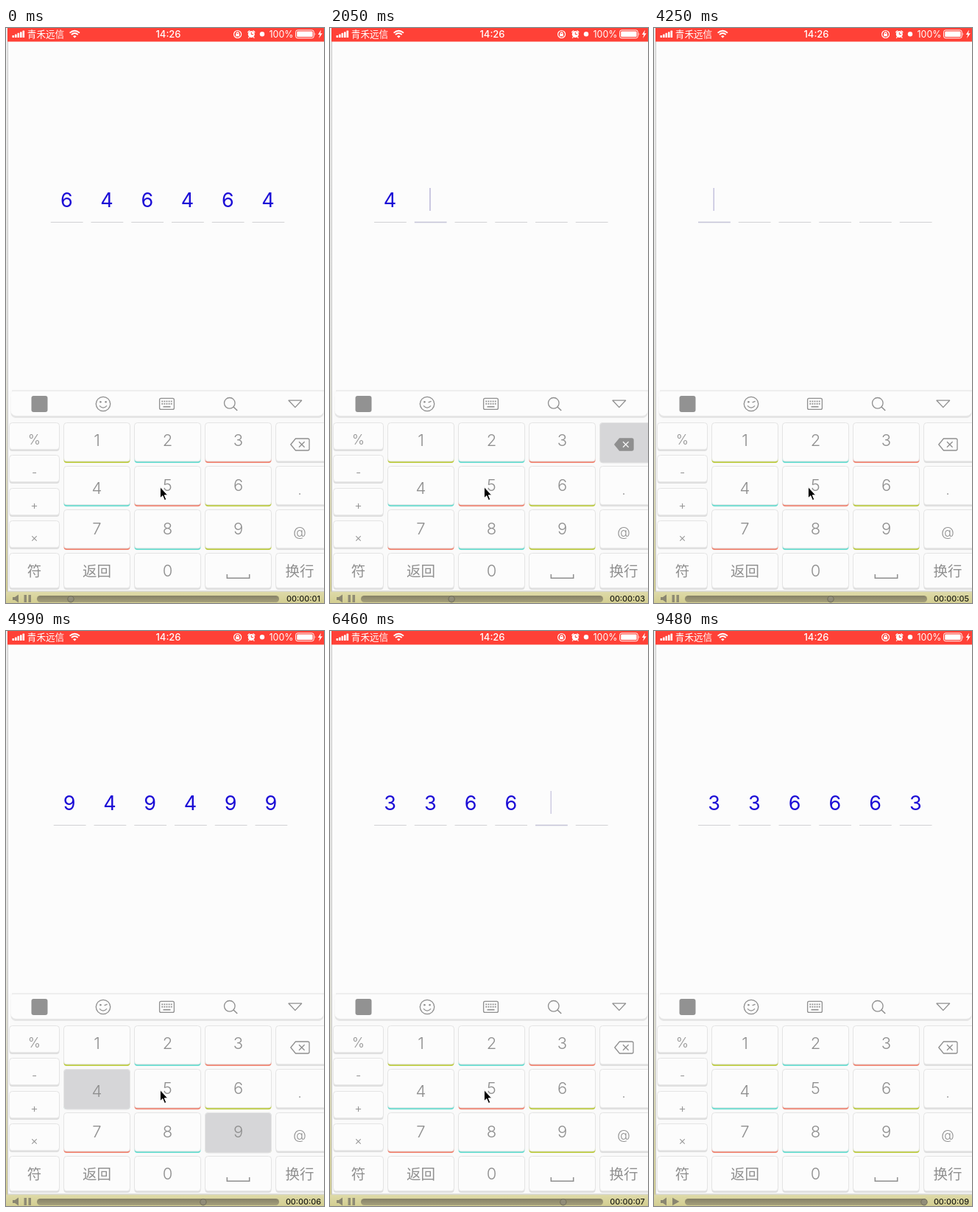
An HTML page that plays this animation: 432 by 780 pixels, repeating every 9580 ms.

```html
<!DOCTYPE html>
<html lang="zh">
<head>
<meta charset="utf-8">
<title>Code input</title>
<style>
html, body { margin: 0; width: 100%; height: 100%; overflow: hidden; background: #fcfcfc; }
svg { display: block; width: 100vw; height: 100vh; }
text { font-family: Inter, "Noto Sans CJK SC", "Noto Sans CJK", sans-serif; }
</style>
</head>
<body>
<svg id="stage" viewBox="0 0 432 780" preserveAspectRatio="none">
  <defs>
    <linearGradient id="edge" x1="0" y1="0" x2="0" y2="1">
      <stop offset="0" stop-color="#ececec"/>
      <stop offset=".55" stop-color="#e3e3e1"/>
      <stop offset=".72" stop-color="#deddcf"/>
      <stop offset="1" stop-color="#d2cd95"/>
    </linearGradient>
    <linearGradient id="bar" x1="0" y1="0" x2="0" y2="1">
      <stop offset="0" stop-color="#dedaa9"/>
      <stop offset="1" stop-color="#d3ce91"/>
    </linearGradient>
    <linearGradient id="track" x1="0" y1="0" x2="0" y2="1">
      <stop offset="0" stop-color="#858066"/>
      <stop offset="1" stop-color="#a6a17c"/>
    </linearGradient>
  </defs>
</svg>
<script>
const LOOP = 9580;
const stage = document.getElementById('stage');

function add(tag, attrs, parent = stage) {
  const el = document.createElementNS('http://www.w3.org/2000/svg', tag);
  for (const name in attrs) el.setAttribute(name, attrs[name]);
  parent.appendChild(el);
  return el;
}
const set = (el, name, value) => el.setAttribute(name, value);
const show = (el, on) => set(el, 'visibility', on ? 'visible' : 'hidden');
const rect = (x, y, width, height, fill, extra, parent) =>
  add('rect', { x, y, width, height, fill, ...extra }, parent);
const path = (d, attrs, parent) => add('path', { d, fill: 'none', ...attrs }, parent);
const circle = (cx, cy, r, attrs, parent) => add('circle', { cx, cy, r, ...attrs }, parent);

// Text centred on a point
function label(str, x, cy, size, fill, extra, parent) {
  const el = add('text', {
    x, y: cy + size * 0.363, 'font-size': size, fill, 'text-anchor': 'middle', ...extra
  }, parent);
  el.textContent = str;
  return el;
}

// Window and status bar
rect(0, 0, 432, 780, '#fcfcfc');
rect(0, 0, 2, 766, 'url(#edge)');
rect(2, 0, 1, 765, '#cbcbcb');
rect(2, 0, 430, 18.5, '#ff4137');

const white = { stroke: '#fff', 'stroke-width': 1.2 };
for (let i = 0; i < 5; i++) rect(8.5 + i * 3.5, 10 - i * 1.6, 2.6, 3 + i * 1.6, '#fff', { rx: 0.6 });
label('青禾远信', 54, 8.2, 12.6, '#fff');
path('M86.6 6.6Q93.3 .8 100 6.6M88.9 9Q93.3 5.2 97.7 9', { stroke: '#fff', 'stroke-width': 1.9 });
path('M91 11.2Q93.3 9.2 95.6 11.2L93.3 13.6Z', { fill: '#fff' });
label('14:26', 220.5, 8.5, 13, '#fff', { 'font-weight': 500 });

circle(314.6, 8.5, 5, { ...white, fill: 'none' });
rect(312.2, 7.9, 4.8, 3.4, '#fff');
path('M313.2 8V6.8Q314.6 4.6 316 6.8V8', white);
circle(333.3, 8.5, 4.5, { fill: '#fff' });
path('M328.3 6L331 3.4M338.3 6L335.6 3.4M330.4 12.2L329.2 13.6M336.2 12.2L337.4 13.6', white);
path('M333.3 5.7V8.7H336', { stroke: '#ff4137' });
circle(348, 8.3, 3.2, { fill: '#fff' });
label('100%', 374, 8.5, 12.4, '#fff');
rect(393.6, 2.9, 24.6, 10.8, 'none', { rx: 2.5, stroke: '#fff', 'stroke-width': 1 });
rect(395.2, 4.5, 21.4, 7.6, '#fff', { rx: 1.2 });
path('M419.6 6.2Q421.4 8.3 419.6 10.4Z', { fill: '#fff' });
path('M428 2.6L423.8 9H426.4L425 14L429.8 7.2H427Z', { fill: '#fff' });

// Code cells
const code = add('g', {});
const cells = [];
for (let i = 0; i < 6; i++) {
  const x = 60 + i * 54.75;
  cells.push({
    digit: label('', x + 21.5, 233.2, 27, '#1b0cd6', {}, code),
    line: rect(x, 263, 43.8, 1, '#d2d2d4', {}, code)
  });
}
const caret = rect(0, 217, 1.2, 31, '#aaa7cf', {}, code);

// Keyboard toolbar
rect(3, 492, 429, 273, '#fafafa');
rect(6.5, 494, 425, 35, '#e5e5e5', { rx: 7 });
rect(6.5, 492, 425, 34, '#fcfcfc', { rx: 7 });
rect(8, 491.5, 424, 1, '#e2e2e2');
const ink = '#8f8f8f';
const thin = { stroke: ink, 'stroke-width': 1.3, fill: 'none', 'stroke-linejoin': 'round' };

rect(34.5, 499, 22, 22, '#929292', { rx: 3 });
circle(132, 510, 9.7, thin);
path('M127 512.4Q132 518 137 512.4', thin);
circle(128.4, 507.2, 1.3, { fill: ink });
const openEye = circle(135.6, 507.2, 1.3, { fill: ink });
const wink = path('M133.6 507.8L137.6 506.4', thin);

rect(208.6, 502.4, 19.8, 15, 'none', { rx: 2, stroke: ink, 'stroke-width': 1.3 });
for (let row = 0; row < 2; row++)
  for (let i = 0; i < 5; i++) rect(211.4 + i * 3.1, 505.6 + row * 3.3, 1.8, 1.8, ink);
rect(213.5, 513, 10, 1.5, ink);
circle(303.8, 508.8, 7.3, thin);
path('M309 514L314.2 519', { ...thin, 'stroke-width': 1.6 });
path('M384 505.2H401.6L392.8 514.6Z', thin);

// Keys
const OLIVE = '#bccb3e', TEAL = '#66dccf', SALMON = '#f08370';
const keys = {};
function key(name, x, y, w, h, textY, size, accent) {
  const cx = x > 360 ? 399 : x + w / 2;
  rect(x + 0.5, y + 2, w - 1, h - 2, accent || '#dedede', { rx: 4 });
  rect(x + 0.5, y + 0.5, w - 1, h - 2.7, '#fcfcfc', { rx: 4, stroke: '#e4e4e4', 'stroke-width': 1 });
  const down = rect(x + 0.5, y + 0.5, w - 1, h - 0.5, '#d6d6d8',
    { rx: 4, stroke: '#e6e6e6', 'stroke-width': 1 });
  if (size) label(name, cx, textY, size, ink, { 'font-weight': 300 });
  keys[name] = down;
}

[['%', 535, 558, 18], ['-', 579, 602.5, 16], ['+', 624, 647.5, 16], ['×', 668, 691.5, 16]]
  .forEach(([name, y, textY, size]) => key(name, 4, y, 69, 39, textY, size));
key('符', 4, 712, 69, 50, 737.4, 19.5);

const accents = [OLIVE, TEAL, SALMON, TEAL, SALMON, OLIVE, SALMON, TEAL, OLIVE];
const textRows = [559.5, 620.5, 679.5];
accents.forEach((accent, i) => {
  const row = Math.floor(i / 3);
  key(String(i + 1), 78 + (i % 3) * 96, 535 + row * 59, 91, 55,
    i === 3 ? 624.5 : textRows[row], 22, accent);
});
key('返回', 78, 712, 91, 50, 737.4, 19.5);
key('0', 174, 712, 91, 50, 736, 22);
key('space', 270, 712, 91, 50);
path('M300.3 741V746.3H330.7V741', { stroke: ink, 'stroke-width': 1.5 });
key('<', 366, 535, 70, 55);
key('.', 366, 594, 70, 55, 626, 18);
key('@', 366, 653, 70, 55, 683.5, 18);
key('换行', 366, 712, 70, 50, 737.4, 19.5);
const eraser = path('M386.8 565L393.4 557H410Q412 557 412 559V571Q412 573 410 573H393.4Z', thin);
const cross = path('M398 561.2L405.6 568.8M405.6 561.2L398 568.8', thin);

// Player bar
rect(0, 764.5, 432, 15.5, 'url(#bar)');
rect(2, 763.5, 430, 1, '#c9c9c5');
path('M9 772H12L17 768.5V779.5L12 776H9Z', { fill: '#8a8670' });
const pauseIcon = path('M24.5 769H28V779H24.5ZM30.5 769H34V779H30.5Z', { fill: '#8f8b74' });
const playIcon = path('M25 768.8L34.4 774L25 779.2Z', { fill: '#8a8670' });
rect(42, 770, 329, 9, 'url(#track)', { rx: 4.5 });
const knob = circle(0, 774.7, 4.2, { fill: '#918d79', stroke: '#6f6c59', 'stroke-width': 1 });
const clock = label('', 404, 774.2, 10.8, '#1c1c14', { 'font-weight': 500 });

const pointer = path('M209.4 622.6V637.8L212.8 634.6L215.4 640.6L217.8 639.6L215.3 633.8H219.8Z',
  { fill: '#000', stroke: '#fff', 'stroke-width': 1 });

// Key presses: '<' erases one digit
const presses = [];
function press(start, gap, names) {
  [...names].forEach((name, i) => presses.push({ time: start + i * gap, name }));
}
press(140, 90, '<<<<<<');
press(680, 95, '464646');
press(1620, 95, '<<<<<<');
press(2200, 105, '949494');
press(3100, 110, '<<<<<<');
press(4340, 100, '949499');
press(5200, 80, '<<<<<<');
press(5700, 120, '3366');
press(6740, 127, '63');

const HOLD = 360;
const knobPath = [[0, 88], [2050, 165], [3360, 206], [4990, 268], [6460, 317], [7480, 352], [7930, 367], [LOOP, 367]];

function along(points, t) {
  const i = Math.max(1, points.findIndex(p => p[0] >= t));
  const [t0, a] = points[i - 1], [t1, b] = points[i];
  return a + (b - a) * (t - t0) / (t1 - t0);
}

function shake(age) {
  return age < 800 ? 7 * (1 - age / 800) * Math.sin(age / 110 * 2 * Math.PI) : 0;
}

function draw(t) {
  let typed = '646464', filledAt = -490;
  const held = new Set();
  for (const { time, name } of presses) {
    if (time > t) break;
    typed = name === '<' ? typed.slice(0, -1) : typed + name;
    if (typed.length === 6) filledAt = time;
    if (t - time < HOLD) held.add(name);
  }
  const full = typed.length === 6;

  cells.forEach(({ digit, line }, i) => {
    const active = i === typed.length;
    digit.textContent = typed[i] || '';
    set(line, 'y', active ? 262.7 : 263);
    set(line, 'height', active ? 1.6 : 1);
    set(line, 'fill', active ? '#c6c5d8' : '#d2d2d4');
  });
  set(code, 'transform', `translate(${full ? shake(t - filledAt) : 0} 0)`);
  show(caret, !full);
  set(caret, 'x', 80.6 + typed.length * 54.75);
  set(caret, 'opacity', 0.85 + 0.15 * Math.cos(t / 500 * Math.PI));

  for (const name in keys) show(keys[name], held.has(name));
  const erasing = held.has('<');
  set(eraser, 'fill', erasing ? ink : 'none');
  set(cross, 'stroke', erasing ? '#f4f4f4' : ink);

  const smiling = t < 1000 || (t > 6000 && t < 7000);
  show(openEye, smiling);
  show(wink, !smiling);

  const x = along(knobPath, t);
  set(knob, 'cx', x);
  clock.textContent = '00:00:0' + Math.floor((x - 42) / 34.6);
  const ended = t >= 9480;
  show(pointer, !ended);
  show(pauseIcon, !ended);
  show(playIcon, ended);
}

// The screen refreshes in even steps
const STEP = 146.7;
const origin = performance.now();
function tick() {
  const t = (performance.now() - origin) % LOOP;
  draw(t >= 9480 ? t : Math.floor((t + 20) / STEP) * STEP);
  requestAnimationFrame(tick);
}
draw(0);
requestAnimationFrame(tick);
</script>
</body>
</html>
```
